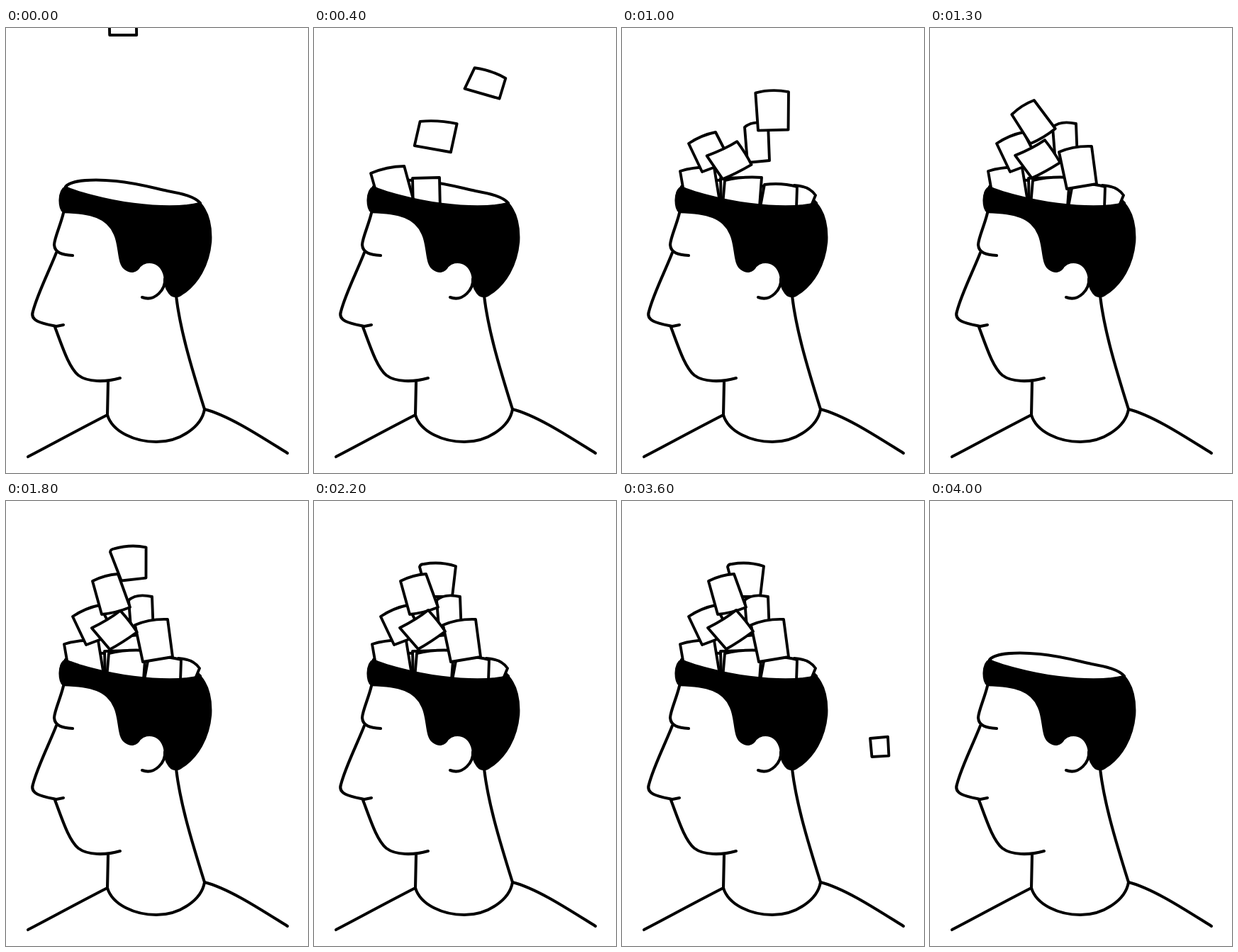
Animation, 426 px wide and 628 px high, one loop 4.1 s. Source, as an HTML page:

```html
<!DOCTYPE html>
<html lang="en">
<head>
<meta charset="utf-8">
<title>Filling head</title>
<style>
  html, body { margin: 0; width: 100%; height: 100%; overflow: hidden; background: #fff; }
  svg { display: block; width: 426px; height: 628px; }
  path { fill: none; stroke: #000; stroke-width: 4.1; stroke-linecap: round; stroke-linejoin: round; }
  #blocks path { fill: #fff; stroke-width: 3.9; }
  #hair { fill: #000; stroke-width: 2.5; }
</style>
</head>
<body>
<svg viewBox="0 0 426 628">
  <path d="M84 224C92 214 125 213 155 216C185 219 205 225 228 230C250 234 266 238 274 247"/>
  <g id="blocks"></g>
  <path id="hair" d="M84 224C95 230 140 243 180 248C220 253 250 253 274 247C287 262 290 283 289 302C286 335 270 362 249 375C242 381 233 380 229 372C226 368 224 362 224 354C221 329 199 326 189 336C184 345 176 346 168 340C157 332 161 308 153 291C143 267 120 261 81 260C74 255 73 230 84 224Z"/>
  <path d="M224 354C226 368 210 387 192 380"/>
  <path d="M81 261C77 278 68 297 68 306C69 318 80 320 94 321"/>
  <path d="M71 317C60 345 44 376 38 400C33 414 52 417 71 421L81 419"/>
  <path d="M69 422C79 448 88 478 102 490C115 500 140 500 161 494"/>
  <path d="M144 500L143 546C150 570 182 584 212 584C245 584 276 563 280 538C265 490 246 430 240 378"/>
  <path d="M143 546C100 568 60 590 31 605"/>
  <path d="M280 538C315 547 360 577 397 600"/>
</svg>
<script>
const STEP = 100, STEPS = 41, EMPTY = 40;
const SPEED = 80; // fall per step
const layer = document.getElementById('blocks');
const parts = [];

const clamp = v => Math.min(1, Math.max(0, v));
const smooth = v => (v = clamp(v), v * v * (3 - 2 * v));

// move(step) gives the shift and turn about the pivot, or null while out of sight
function part(d, px, py, move) {
  const el = document.createElementNS('http://www.w3.org/2000/svg', 'path');
  el.setAttribute('d', d);
  layer.append(el);
  parts.push({ el, px, py, move });
}

// falls at constant speed, lands tilted by rock, then settles flat
function block(d, px, py, { land, drift = 0, rock = 0, settle = 1 }) {
  part(d, px, py, s => {
    const left = Math.max(0, land - s);
    const tilt = left ? 1 + left : 1 - clamp((s - land) / settle);
    return { x: drift * left, y: -SPEED * left, turn: rock * tilt };
  });
}

// sugar cube thrown off the top of the pile
function toss(s) {
  if (s < 26 || s > 38) return null;
  return {
    x: 165 * smooth((s - 26.7) / 9.8),
    y: 2.47 * (s - 25.5) ** 2,
    turn: -0.6 * (s - 31)
  };
}

// listed from back to front
part('M187 62L212 61L212 88L188 88Z', 200, 75, toss);
block('M149 93Q150 89 155 89Q178 85 200 92L195 135L160 135Z', 175, 112,
  { land: 18.3, rock: -5, settle: 3 });
block('M139 212L177 211L178 258L140 258Z', 158, 235, { land: 3.1, drift: 2 });
block('M243 222Q264 223 273 236L257 275L225 262Z', 250, 249, { land: 8, drift: 28, rock: -1 });
block('M173 140Q184 130 206 135L208 187L177 190Z', 190, 162, { land: 8.4, drift: -7.5, rock: -3.7 });
block('M145 215Q170 209 197 211L194 252L142 250Z', 169, 232, { land: 5, drift: 2, rock: 4 });
block('M82 202Q105 195 130 197L138 246L90 248Z', 110, 222, { land: 4, drift: -4, rock: -6 });
block('M201 221Q225 218 247 224L246 254L195 253Z', 222, 240, { land: 6, drift: 10, rock: 5 });
block('M182 175Q203 166 228 167L235 220L193 227Z', 208, 197, { land: 11, drift: 3, rock: 4 });
block('M94 163Q112 151 132 147L153 188L113 203Z', 148, 195,
  { land: 7, drift: -20, rock: -8, settle: 2 });
block('M122 113Q140 104 158 103L175 150Q155 158 135 160Z', 149, 140,
  { land: 13, drift: 2, rock: -17, settle: 2 });
block('M121 179Q145 167 161 154Q175 169 185 184Q165 199 147 209Z', 109, 168,
  { land: 7, drift: 5, rock: 9, settle: 12 });

const start = performance.now();
function draw() {
  const s = Math.floor((performance.now() - start) / STEP) % STEPS;
  for (const { el, px, py, move } of parts) {
    const pose = s < EMPTY && move(s);
    el.style.display = pose ? '' : 'none';
    if (pose) el.setAttribute('transform',
      `translate(${pose.x} ${pose.y}) rotate(${pose.turn} ${px} ${py})`);
  }
  requestAnimationFrame(draw);
}
draw();
</script>
</body>
</html>
```
